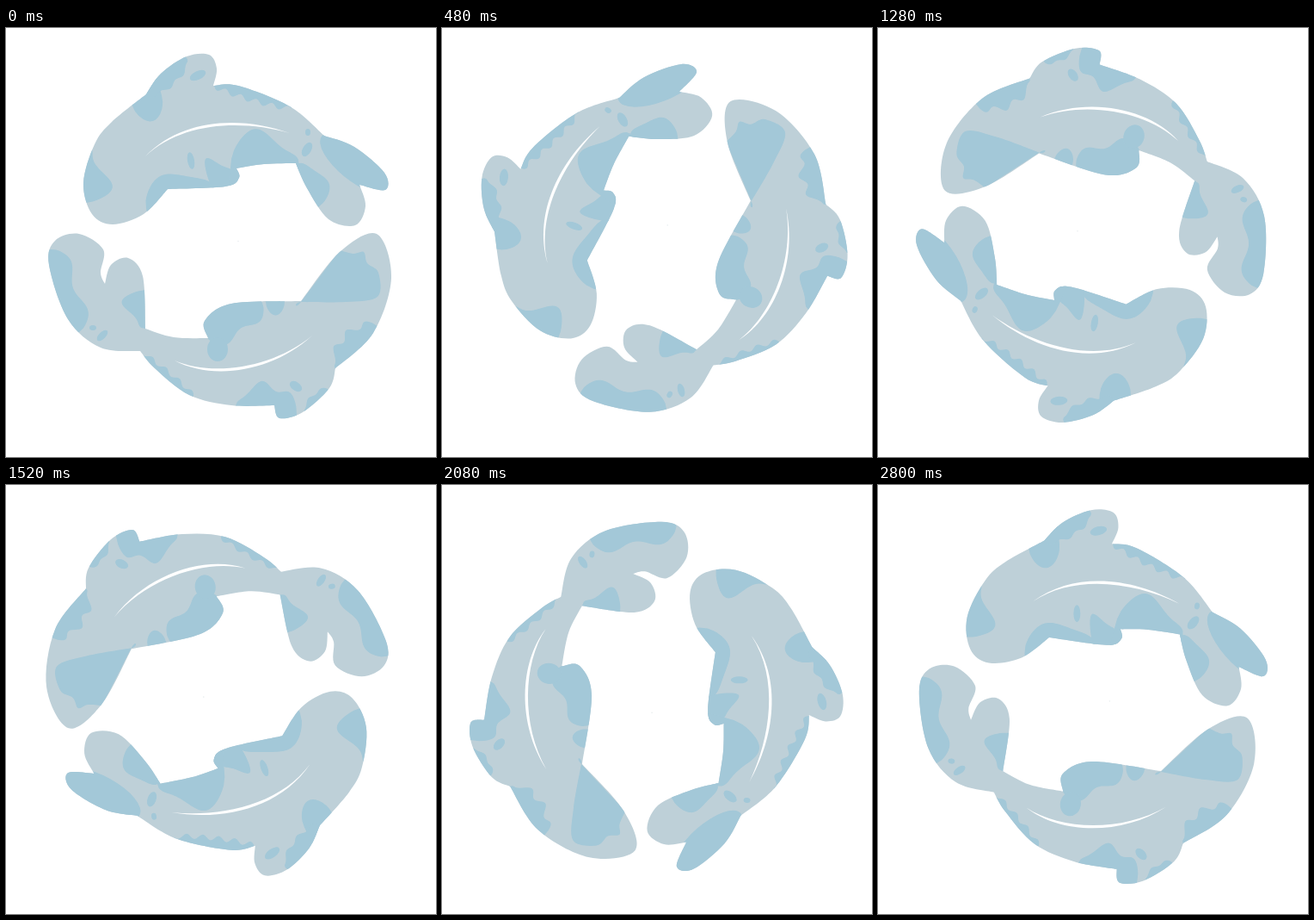
Write an HTML page that moves like this. It is 500x498 px and loops after 2880 ms.

```html
<!DOCTYPE html>
<html lang="en">
<head>
<meta charset="utf-8">
<title>Two koi</title>
<style>
html, body { margin: 0; width: 100%; height: 100%; overflow: hidden; background: #fff; }
svg { display: block; width: 100%; height: 100%; }
</style>
</head>
<body>
<svg viewBox="0 0 500 498" xmlns="http://www.w3.org/2000/svg">
  <defs></defs>
  <g id="pond"></g>
</svg>
<script>
const NS = 'http://www.w3.org/2000/svg';
const LOOP = 2880, STEP = 80, CX = 250, CY = 245;
const SKIN = '#bed0d8', SPOT = '#a3c8d8';

const defs = document.querySelector('defs');
const pond = document.getElementById('pond');

function add(parent, tag, attrs) {
  const el = document.createElementNS(NS, tag);
  for (const k in attrs) el.setAttribute(k, attrs[k]);
  return parent.appendChild(el);
}

// Closed smooth curve through "x,y" points; a trailing "!" makes a sharp corner.
function curve(text) {
  const p = text.trim().split(/\s+/).flatMap(s => {
    const xy = s.replace('!', '').split(',').map(Number);
    return s.endsWith('!') ? [xy, xy] : [xy];
  });
  const n = p.length, at = i => p[(i + n) % n];
  let d = 'M' + p[0];
  for (let i = 0; i < n; i++) {
    const [a, b, c, e] = [at(i - 1), at(i), at(i + 1), at(i + 2)];
    const c1 = b.map((v, k) => v + (c[k] - a[k]) / 6);
    const c2 = c.map((v, k) => v - (e[k] - b[k]) / 6);
    d += `C${c1} ${c2} ${c}`;
  }
  return d + 'Z';
}

// Wavy patch on the rim from a to b, clockwise round the body; the skin clips its outer side.
function patch(a, b, depth, amp = 0, lobes = 1) {
  const dx = b[0] - a[0], dy = b[1] - a[1], len = Math.hypot(dx, dy);
  const place = (u, h) => [a[0] + dx * u - dy / len * h, a[1] + dy * u + dx / len * h];
  const pts = [place(0, -60)];
  for (let i = 0; i <= 40; i++) {
    const u = i / 40;
    const rise = depth * Math.sqrt(Math.max(0, Math.sin(Math.PI * u)));
    pts.push(place(u, rise + amp * Math.sin(2 * Math.PI * lobes * u)));
  }
  pts.push(place(1, -60));
  return 'M' + pts.join('L') + 'Z';
}

function blob(x, y, rx, ry, turn = 0) {
  const r = turn * Math.PI / 180, ex = rx * Math.cos(r), ey = rx * Math.sin(r);
  const arc = `A${rx} ${ry} ${turn} 0 1 `;
  return `M${x - ex} ${y - ey}${arc}${x + ex} ${y + ey}${arc}${x - ex} ${y - ey}Z`;
}

// Tapered stroke: a cubic out and a slightly flatter one back.
function streak(a, c1, c2, b, width) {
  const shift = ([x, y]) => [x, y + width];
  return `M${a}C${c1} ${c2} ${b}C${shift(c2)} ${shift(c1)} ${a}Z`;
}

const koi = [
  {
    body: `90,180 103,135 123,109 163,77! 180,53 210,33 236,31 245,47 241,67! 270,67 330,91 370,125!
      405,138 440,168 441,188 411,182! 418,207 406,229 375,222 350,186 337,157! 300,158 268,163! 271,174
      255,184 188,187! 160,216 124,228 100,216`,
    spots: [
      patch([146, 88], [181, 78], 26),
      patch([163, 78], [211, 36], 11, 2, 3),
      blob(223, 55, 10, 5, -25),
      patch([242, 67], [332, 93], 4, 3, 5),
      patch([93, 203], [95, 138], 22, 11),
      patch([243, 187], [163, 210], 30, -5),
      patch([268, 172], [240, 187], 30, -8),
      patch([341, 160], [262, 152], 32, -9),
      blob(215, 154, 4, 10, -10),
      blob(351, 121, 3, 4),
      blob(350, 141, 5, 9, 30),
      blob(406, 157, 50, 20, 39),
      patch([363, 208], [337, 158], 22, 4)
    ],
    line: streak([162, 149], [205, 104], [275, 102], [330, 122], 4.5)
  },
  {
    body: `50,275 57,247 85,239 113,257 110,284 115,297! 122,275 142,267 159,288 162,349! 195,359 235,360!
      231,340 262,320 343,317! 388,260 431,239 448,290 427,354 383,395! 376,418 345,446 318,453 312,438!
      262,438 213,426 173,395 156,375! 110,371 72,338`,
    spots: [
      patch([85, 353], [52, 257], 16, 6, 1.5),
      patch([162, 304], [162, 349], 22, 8),
      blob(101, 348, 4, 3),
      blob(112, 357, 8, 4, -45),
      patch([218, 427], [156, 376], 3, 2.5, 4),
      patch([236, 362], [298, 319], 15, 5, 1.5),
      blob(246, 373, 12, 14),
      patch([302, 318], [324, 317], 16),
      curve('343,318! 388,258! 404,262 416,260 420,273 433,284 432,312 395,318'),
      patch([432, 346], [383, 396], 19, 4, 3),
      blob(337, 416, 8, 5, 35),
      patch([374, 419], [347, 446], 7, 1.5, 2),
      patch([338, 450], [266, 441], 31, 5, 2)
    ],
    line: streak([196, 386], [240, 405], [310, 395], [356, 357], 4.5)
  }
];

koi.forEach((fish, i) => {
  const body = curve(fish.body);
  add(add(defs, 'clipPath', { id: 'skin' + i }), 'path', { d: body });
  add(pond, 'path', { d: body, fill: SKIN });
  const marks = add(pond, 'g', { 'clip-path': `url(#skin${i})`, fill: SPOT });
  fish.spots.forEach(d => add(marks, 'path', { d }));
  add(pond, 'path', { d: fish.line, fill: '#fff' });
});
add(pond, 'circle', { cx: 270, cy: 247.5, r: 0.7, fill: '#e4eaec' });

// The pond turns anticlockwise in even steps, once per loop.
function draw(ms) {
  const step = Math.floor((ms % LOOP) / STEP);
  pond.setAttribute('transform', `rotate(${-step * 360 * STEP / LOOP} ${CX} ${CY})`);
}

let start = null;
function tick(now) {
  if (start === null) start = now;
  draw(now - start);
  requestAnimationFrame(tick);
}
draw(0);
requestAnimationFrame(tick);
</script>
</body>
</html>
```
